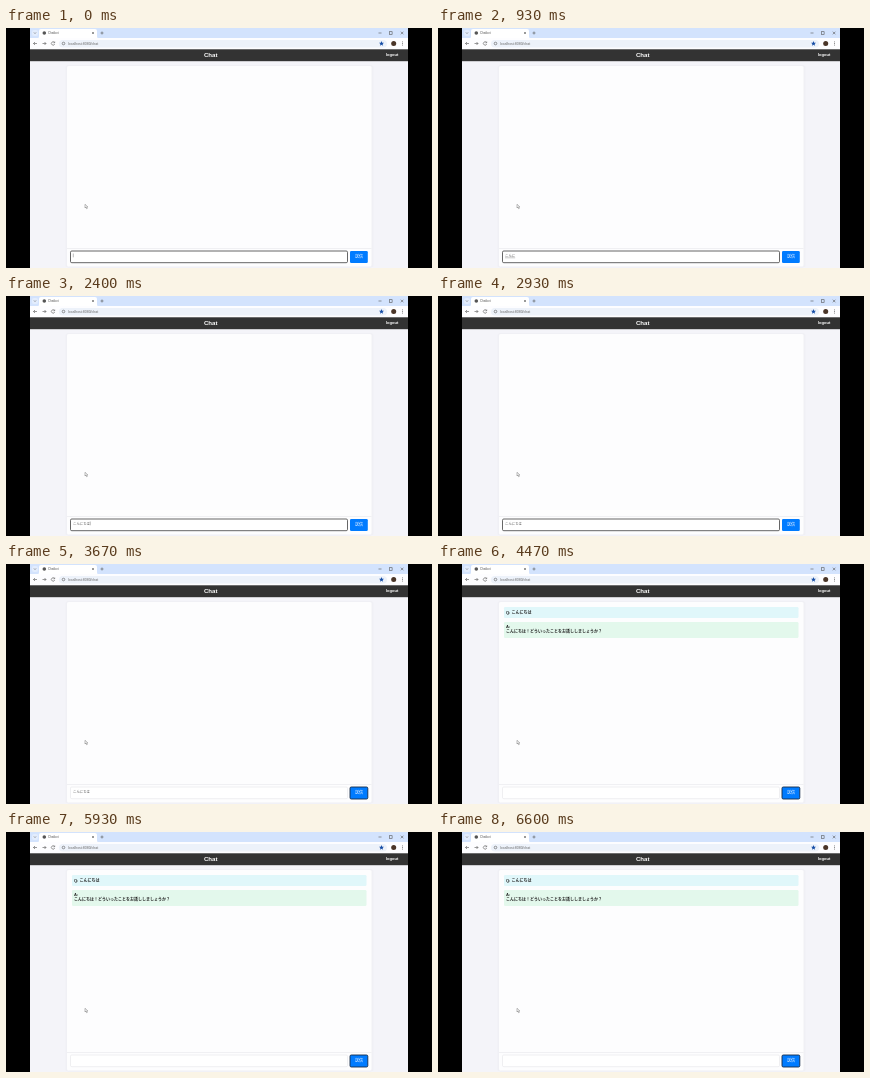
An HTML page that plays this animation: 426 by 240 pixels, repeating every 6.67 s.

```html
<!DOCTYPE html>
<html lang="en">
<head>
<meta charset="utf-8">
<title>Chat</title>
<style>
  html, body { margin: 0; width: 100%; height: 100%; overflow: hidden; background: #000; }
  svg { display: block; width: 100%; height: 100%; }
  text { font-family: "Liberation Sans", "Noto Sans CJK JP", "Noto Sans CJK", sans-serif; font-size: 4px; fill: #222; }
  .bold { font-weight: bold; }
  .white { fill: #fff; }
  .mid { text-anchor: middle; }
  .icon { fill: none; stroke: #555; stroke-width: .6; }
</style>
</head>
<body>
<svg viewBox="0 0 426 240">
  <rect width="426" height="240"/>
  <rect x="24" width="378" height="240" fill="#f4f4f9"/>

  <!-- browser window -->
  <rect x="24" width="378" height="10.500" fill="#d3e3fd"/>
  <path d="M31 10.500q2 0 2-2V3q0-2 2-2H89q2 0 2 2v5.500q0 2 2 2z" fill="#fff"/>
  <rect x="24" y="10" width="378" height="11.500" fill="#fdfdff"/>
  <rect x="53" y="12" width="328" height="7.500" rx="3.750" fill="#edf2fa"/>
  <rect x="26" y="2" width="6" height="6" rx="2" fill="#e3edfd"/>
  <circle cx="38.300" cy="5" r="1.800" fill="#555"/>
  <text x="42" y="6.200" style="font-size:3px;fill:#555">Chatbot</text>
  <text x="62" y="16.800" style="font-size:3.500px;fill:#666">localhost:8080/chat</text>
  <g class="icon">
    <path d="M28 4.500l1 1 1-1M86 4l2 2m0-2l-2 2M94.500 5h3M96 3.500v3"/>
    <path d="M31 15.500h-3.500m1.500-1.500l-1.500 1.500 1.500 1.500M36.500 15.500h3.500m-1.500-1.500l1.500 1.500-1.500 1.500"/>
    <path d="M48.500 14.500a1.700 1.700 0 1 0 .2 1.500M48.700 13.500v1.300h-1.300"/>
    <circle cx="57.500" cy="15.500" r="1.300"/>
    <path d="M372.500 5h3M394.800 3.700l2.600 2.600m0-2.600l-2.600 2.600"/>
    <rect x="383.500" y="3.700" width="2.600" height="2.600"/>
    <path d="M396.500 13.500v.8m0 .8v.8m0 .8v.8" stroke-width=".8"/>
  </g>
  <path d="M375.500 13l.7 1.700 1.800.1-1.400 1.200.5 1.800-1.600-1-1.600 1 .5-1.800-1.400-1.200 1.800-.1z" fill="#174ea6"/>
  <circle cx="387.700" cy="15.500" r="2.500" fill="#4a3528"/>

  <!-- page -->
  <rect x="24" y="21.300" width="378" height="11.900" fill="#333"/>
  <text class="bold white mid" x="204.700" y="29.300" style="font-size:6.100px">Chat</text>
  <text class="bold white" x="379.800" y="28.200" style="font-size:4.100px">logout</text>
  <rect x="59.500" y="37" width="308" height="202.500" rx="2.500" fill="#f0f0f5"/>
  <rect x="61" y="38" width="304.500" height="200.500" rx="1.500" fill="#fdfdfe"/>
  <path d="M61 220.500H365.500" stroke="#e8e8ec" stroke-width=".6"/>

  <g id="messages">
    <rect x="66" y="43" width="294.500" height="11" rx="1.300" fill="#e0f7fa"/>
    <rect x="66" y="58" width="294.500" height="16" rx="1.300" fill="#e3f8ec"/>
    <text class="bold" x="68" y="49.900">Q: こんにちは</text>
    <text class="bold" x="68" y="64">A:</text>
    <text class="bold" x="68" y="69.400">こんにちは！どういったことをお話ししましょうか？</text>
  </g>

  <rect id="field" x="64.500" y="223" width="277" height="11.700" rx="1.300" fill="#fff"/>
  <text id="draft" x="67" y="228.900" style="font-size:3.400px;fill:#555"></text>
  <path id="underline" stroke="#777" stroke-width=".4"/>
  <path id="caret" stroke="#555" stroke-width=".4"/>
  <rect id="button" x="344" y="223" width="17.800" height="12" rx="1.300" fill="#007bff"/>
  <text class="white mid" x="352.900" y="230.400">送信</text>

  <path d="M79 176.300v3.700l.9-.8.7 1.500.7-.3-.7-1.500h1.200z" fill="#fff" stroke="#555" stroke-width=".4"/>
</svg>
<script>
const LOOP = 6670, COMMIT = 2400, CLICK = 3470, REPLY = 4400;
const typing = [[0, ""], [330, "k"], [470, "こ"], [600, "こn"], [730, "こん"], [870, "こんに"],
  [1200, "こんにt"], [1330, "こんにち"], [1530, "こんにちh"], [1670, "こんにちは"], [REPLY, ""]];
const el = id => document.getElementById(id);
const set = (id, attrs) => Object.entries(attrs).forEach(([k, v]) => el(id).setAttribute(k, v));
const draft = el("draft");

function draw(t) {
  const text = typing.filter(([at]) => at <= t).pop()[1];
  const focused = t < CLICK;
  if (draft.textContent !== text) draft.textContent = text;
  const end = 67 + (text ? draft.getComputedTextLength() : 0);
  set("field", { stroke: focused ? "#333" : "#e4e4e8", "stroke-width": focused ? .75 : .6 });
  set("button", { stroke: focused ? "none" : "#162b48", "stroke-width": .9 });
  set("underline", { d: text && t < COMMIT ? `M67 229.800H${end}` : "" });
  set("caret", { d: focused && t % 1000 < 500 ? `M${end + .3} 225.500v3.800` : "" });
  set("messages", { visibility: t >= REPLY ? "visible" : "hidden" });
}

const start = performance.now();
function tick() {
  draw((performance.now() - start) % LOOP);
  requestAnimationFrame(tick);
}
tick();
</script>
</body>
</html>
```
